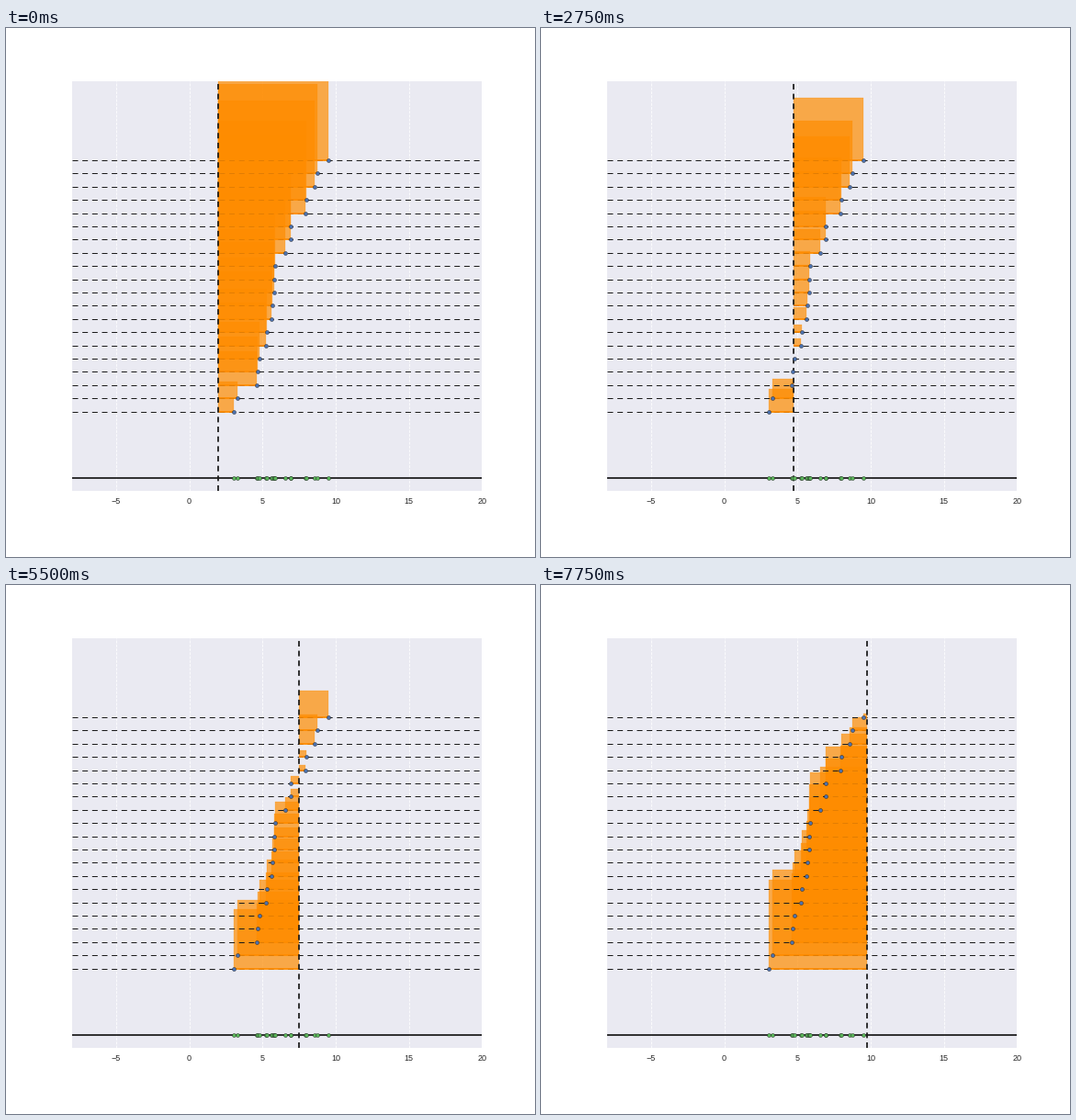
Recreate the animation shown at these times as a matplotlib script. Size 576 by 576 pixels, loop 8000 ms.

```python
import numpy as np
import matplotlib.pyplot as plt
from matplotlib.animation import FuncAnimation
from matplotlib.patches import Rectangle

plt.rcParams["font.family"] = "Liberation Sans"

FRAMES, INTERVAL = 32, 250
START, STEP = 2.0, 0.25
INK = "#1A1A1A"
DASH, GAP = 6, 4.66

rng = np.random.RandomState(0)
xs = np.sort(rng.normal(5, 2, 20))
ys = np.arange(len(xs)) + 5

fig = plt.figure(figsize=(8, 8), dpi=72, facecolor="white")
ax = fig.add_axes([0.125, 0.125, 0.775, 0.775], facecolor="#EAEAF2")
ax.set(xlim=(-8, 20), ylim=(-1, 30), xticks=range(-5, 21, 5), yticks=[])
ax.set_axisbelow(True)
ax.grid(axis="x", color="white", lw=0.8, ls="--")
ax.tick_params(length=0, pad=7, labelsize=9, labelcolor="#262626")
for spine in ax.spines.values():
    spine.set_visible(False)


def dashed(width):
    """Line style with the same dash length in points at any width."""
    return dict(color=INK, lw=width, ls=(0, (DASH / width, GAP / width)))


def dots(heights, color):
    ax.plot(xs, heights, "o", ms=4, mfc=color, mec=INK, mew=0.4, zorder=3)


ax.axhline(0, color=INK, lw=1.75)

squares, offsets = [], []
for x, y in zip(xs, ys):
    ax.axhline(y, **dashed(1))
    square = Rectangle((x, y), 0, 0, color="darkorange", alpha=0.7, lw=0.3)
    squares.append(ax.add_patch(square))
    line, = ax.plot([], [], color="darkorange", lw=1.75,
                    solid_capstyle="butt", zorder=2.1)
    offsets.append(line)

mean_line = ax.axvline(START, zorder=2.5, **dashed(1.75))
dots(ys, "#4C72B0")
dots(np.zeros_like(xs), "#5CB85C")


def update(i):
    mean = START + STEP * i
    mean_line.set_xdata([mean, mean])
    for x, y, square, line in zip(xs, ys, squares, offsets):
        side = abs(x - mean)
        square.set_bounds(min(x, mean), y, side, side)
        line.set_data([mean, x], [y, y])
    return [mean_line, *squares, *offsets]


anim = FuncAnimation(fig, update, frames=FRAMES, interval=INTERVAL,
                     repeat=True, repeat_delay=0)
plt.show()
```
